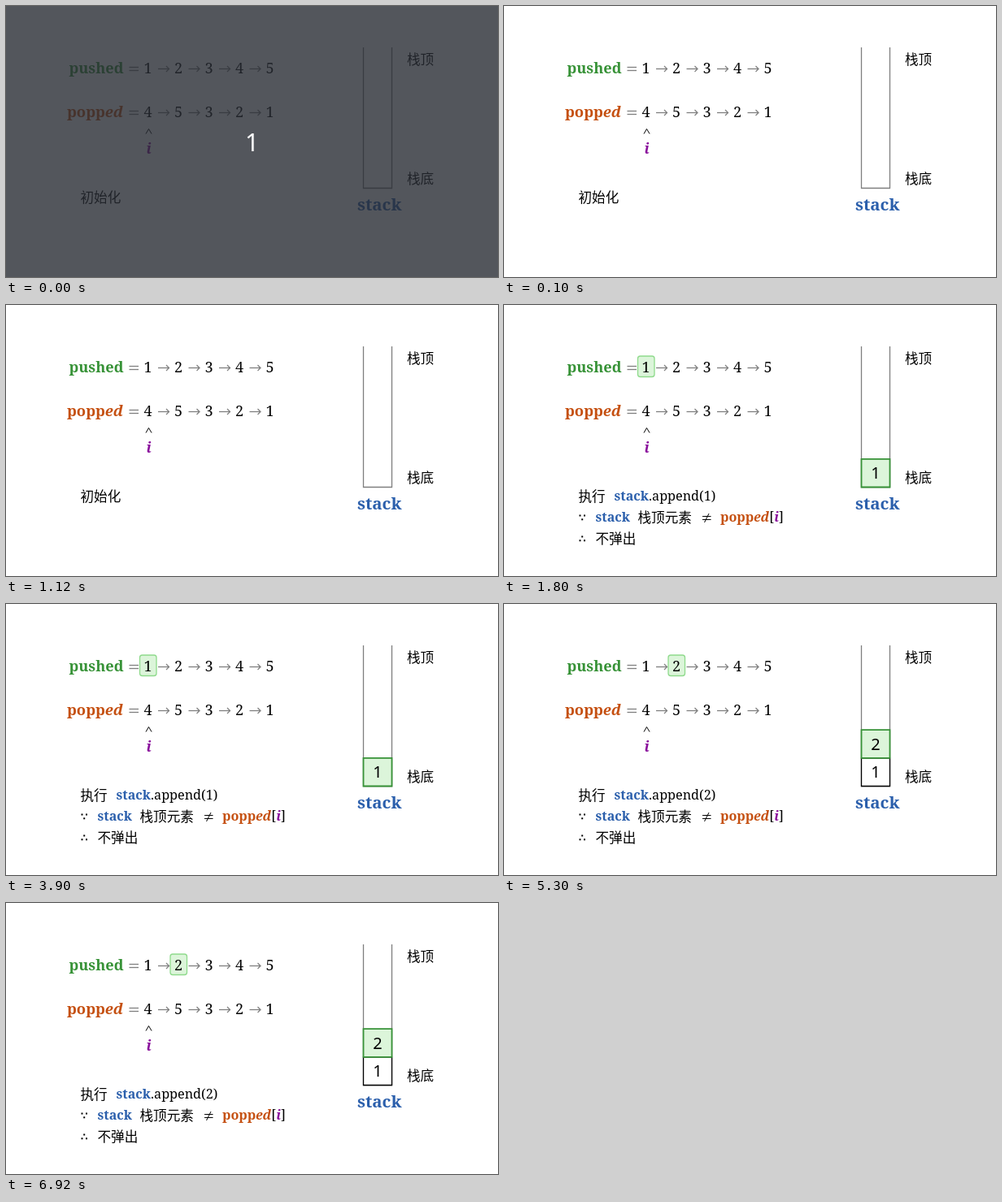
Write an HTML page with a canvas that moves like this. It is 605 by 334 pixels and loops after 8000 ms.

```html
<!DOCTYPE html>
<html lang="zh-CN">
<head>
<meta charset="utf-8">
<title>Stack push and pop</title>
<style>
html, body { margin: 0; width: 100%; height: 100%; overflow: hidden; background: #fff; }
canvas { display: block; }
</style>
</head>
<body>
<canvas id="stage" width="605" height="334"></canvas>
<script>
const ctx = document.getElementById('stage').getContext('2d');
const LOOP = 8000;
const SERIF = '"Noto Serif", serif';
const SANS = '"Noto Sans", sans-serif';
const CJK = '"Noto Sans CJK SC", "Noto Sans CJK", sans-serif';
const GREEN = '#379237', ORANGE = '#c55011', BLUE = '#2b5fac', PURPLE = '#8a0f9c';
const GREY = '#7f7f7f', BLACK = '#000', PALE = '#dcf5da';

// Draws text and returns the x where it ends.
function text(str, x, y, font, color = BLACK, align = 'left') {
  ctx.font = font;
  ctx.fillStyle = color;
  ctx.textAlign = align;
  ctx.fillText(str, x, y);
  return x + ctx.measureText(str).width;
}

const bold = size => `bold ${size}px ${SERIF}`;
const boldItalic = size => `italic bold ${size}px ${SERIF}`;
const chinese = (str, x, y) => text(str, x, y, `300 16.6px ${CJK}`);

function popped(x, y, size) {
  return text('ed', text('popp', x, y, bold(size), ORANGE), y, boldItalic(size), ORANGE);
}

function path(points, color, width = 1) {
  ctx.beginPath();
  points.forEach(([x, y]) => ctx.lineTo(x, y));
  ctx.strokeStyle = color;
  ctx.lineWidth = width;
  ctx.stroke();
}

function box(x, y, w, h, radius, fill, stroke, width) {
  ctx.beginPath();
  ctx.roundRect(x, y, w, h, radius);
  ctx.fillStyle = fill;
  ctx.fill();
  ctx.strokeStyle = stroke;
  ctx.lineWidth = width;
  ctx.stroke();
}

function dots(points) {
  ctx.fillStyle = BLACK;
  points.forEach(([x, y]) => ctx.fillRect(x, y, 2, 2));
}

const itemX = i => 174.5 + 37.5 * i;

function sequence(values, baseline) {
  const mid = baseline - 5.5;
  for (const y of [mid - 2, mid + 2]) path([[151.5, y], [163, y]], GREY, 1.3);
  values.forEach((value, i) => {
    const x = itemX(i);
    text(value, x, baseline, `18px ${SERIF}`, BLACK, 'center');
    if (i === values.length - 1) return;
    path([[x + 12.5, mid], [x + 26, mid]], GREY, 1.3);
    path([[x + 22.5, mid - 3.5], [x + 26, mid], [x + 22.5, mid + 3.5]], GREY, 1.2);
  });
}

function drawLists(pushed) {
  text('pushed', 77.5, 83, bold(18.2), GREEN);
  if (pushed) box(itemX(pushed - 1) - 10, 63, 20.5, 25.5, 3, PALE, '#8fda8c', 1.3);
  sequence([1, 2, 3, 4, 5], 83);
  popped(75, 137, 18.4);
  sequence([4, 5, 3, 2, 1], 137);
  path([[172, 157.5], [175.5, 151.5], [179, 157.5]], BLACK);
  text('i', 175.5, 182, boldItalic(17.5), PURPLE, 'center');
}

function drawStack(count) {
  const bottom = 224.5, size = 34.7, left = 439.5, right = 474.5;
  path([[left, 51], [left, bottom], [right, bottom], [right, 51]], GREY, 1.3);
  for (let n = 1; n <= count; n++) {
    const top = bottom - size * n;
    const newest = n === count;
    box(left, top, right - left, size, 0, newest ? PALE : '#fff',
        newest ? GREEN : BLACK, newest ? 1.8 : 1.3);
    text(n, 457, top + 24.5, `20px ${SANS}`, BLACK, 'center');
  }
  chinese('栈顶', 493, 72);
  chinese('栈底', 493, 218.5);
  text('stack', 432, 251.5, bold(20.5), BLUE);
}

function drawNotes(pushed) {
  if (!pushed) {
    chinese('初始化', 91.5, 241.5);
    return;
  }
  chinese('执行', 91.5, 241.5);
  const end = text('stack', 135.5, 241, bold(16), BLUE);
  text(`.append(${pushed})`, end, 241, `16.2px ${SERIF}`);

  dots([[92.5, 258.5], [98, 258.5], [95.2, 263.3]]);
  text('stack', 112.5, 267, bold(16), BLUE);
  chinese('栈顶元素', 164.5, 268);
  path([[244, 260.5], [254.5, 260.5]], BLACK);
  path([[244, 264.5], [254.5, 264.5]], BLACK);
  path([[252, 257], [246.5, 268]], BLACK);
  let x = popped(266, 267, 16.1);
  x = text('[', x, 267, `16.2px ${SERIF}`);
  x = text('i', x, 267, boldItalic(16.2), PURPLE);
  text(']', x, 267, `16.2px ${SERIF}`);

  dots([[95.2, 284.5], [92.5, 289.3], [98, 289.3]]);
  chinese('不弹出', 112.5, 294);
}

function draw(t) {
  const pushed = t < 1800 ? 0 : t < 5300 ? 1 : 2;
  ctx.fillStyle = '#fff';
  ctx.fillRect(0, 0, 605, 334);
  drawLists(pushed);
  drawStack(pushed);
  drawNotes(pushed);
  if (t < 100) {
    ctx.fillStyle = 'rgba(40, 44, 52, 0.8)';
    ctx.fillRect(0, 0, 605, 334);
    text('1', 302.5, 178.5, `30px ${SANS}`, '#fff', 'center');
  }
}

const start = performance.now();
function tick() {
  draw((performance.now() - start) % LOOP);
  requestAnimationFrame(tick);
}
tick();
</script>
</body>
</html>
```
